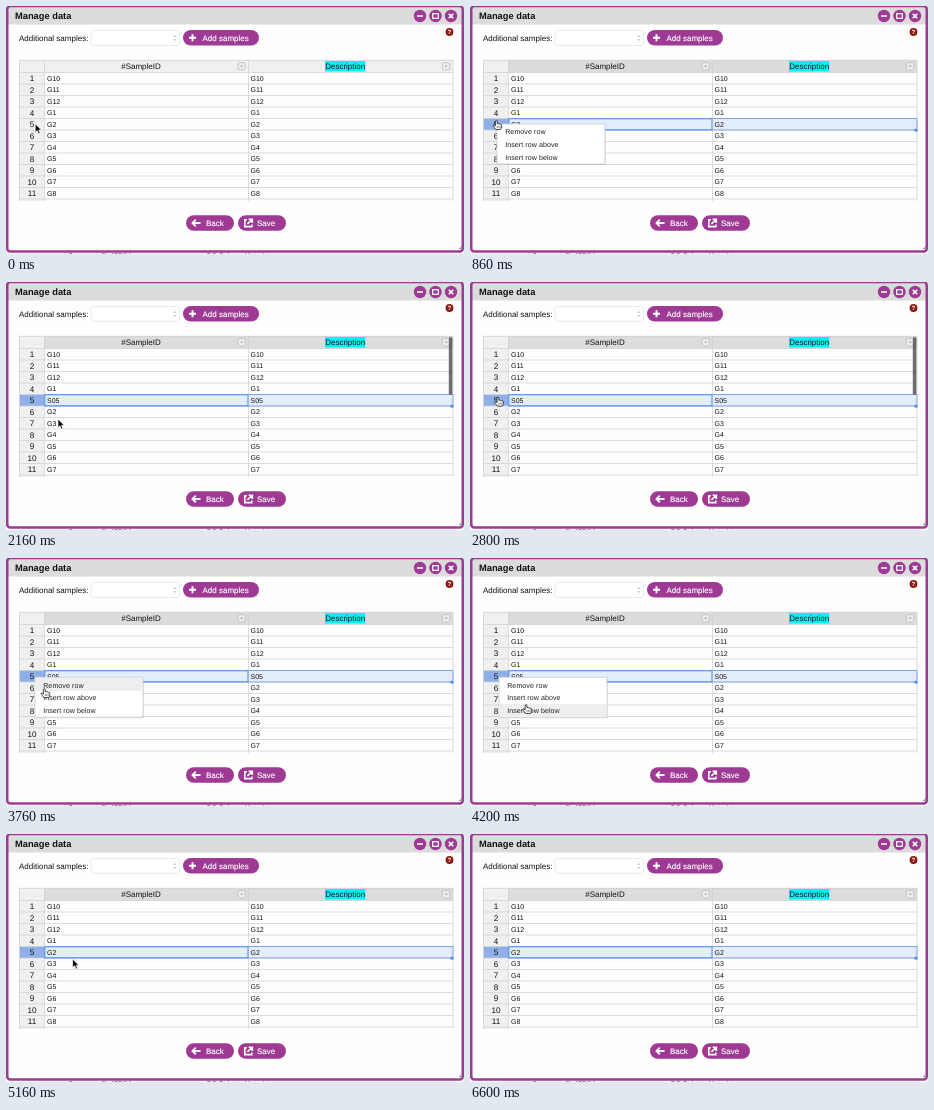
These frames come from a looping animation (458x248 px, 7.63 s). An HTML page:

```html
<!DOCTYPE html>
<html lang="en">
<head>
<meta charset="utf-8">
<title>Manage data</title>
<style>
html, body { margin: 0; width: 100%; height: 100%; overflow: hidden; background: #fff; }
svg {
  display: block; width: 458px; height: 248px;
  font-family: "Liberation Sans", Arial, sans-serif;
  text-rendering: geometricPrecision;
}
</style>
</head>
<body>
<svg id="stage" viewBox="0 0 458 248"></svg>
<script>
const LOOP = 7630, PURPLE = "#9e3a93", GRID = "#d2d2d2", BLUE = "#4b89ff";
const TOP = 66.5, ROW = 11.5;
const stage = document.getElementById("stage");

function add(tag, attrs, parent = stage) {
  const el = document.createElementNS("http://www.w3.org/2000/svg", tag);
  for (const k in attrs) el.setAttribute(k, attrs[k]);
  parent.appendChild(el);
  return el;
}
const group = (parent) => add("g", {}, parent);
const rect = (x, y, width, height, fill, extra, parent) =>
  add("rect", { x, y, width, height, fill, ...extra }, parent);
const path = (d, stroke, width, extra, parent) =>
  add("path", { d, stroke, "stroke-width": width, fill: "none", ...extra }, parent);
function text(str, x, y, size, extra, parent) {
  const el = add("text", { x, y, "font-size": size, fill: "#111", ...extra }, parent);
  el.textContent = str;
  return el;
}
const middle = { "text-anchor": "middle" };
const show = (el, on) => el.setAttribute("visibility", on ? "visible" : "hidden");

// window
text("Summary, PLATE/M", 62, 252, 7, { fill: "#555" });
text("GC Column  Metadata", 200, 252, 7, { fill: "#555" });
rect(1.25, 0, 455.5, 245.5, "#fefefe", { rx: 3 });
rect(2, 0, 454, 18.5, "#dcdcdc");
rect(1.25, 0, 455.5, 245.5, "none", { rx: 3, stroke: PURPLE, "stroke-width": 2.5 });
text("Manage data", 9, 13.2, 9.3, { "font-weight": "bold" });
for (const x of [414, 429.5, 445]) add("circle", { cx: x, cy: 10, r: 6.2, fill: PURPLE });
path("M411 10h6M442.7 7.7l4.6 4.6m0-4.6l-4.6 4.6", "#fff", 1.6);
rect(426.7, 7.7, 5.6, 4.6, "none", { stroke: "#fff", "stroke-width": 1.2 });
path("M453 242.5h1.8v-1.8", "#777", 0.8);

// toolbar
text("Additional samples:", 13, 34.8, 8);
rect(85, 24.5, 88.5, 15, "#fff", { rx: 2, stroke: "#e6e6e6", "stroke-width": 0.8 });
path("M167.4 31l1.4-1.6 1.4 1.6m-2.8 2l1.4 1.6 1.4-1.6", "#aaa", 0.8);
function button(x, y, w, label, labelX) {
  rect(x, y, w, 15.5, PURPLE, { rx: 7.75 });
  text(label, labelX, y + 10.6, 8, { fill: "#fff", stroke: "#fff", "stroke-width": 0.15 });
}
button(177, 24, 76, "Add samples", 196.5);
path("M183 31.8h7m-3.5-3.5v7", "#fff", 1.9);
add("circle", { cx: 443.5, cy: 26, r: 3.9, fill: "#8c1a12" });
text("?", 443.5, 28.3, 6.2, { fill: "#fff", "font-weight": "bold", ...middle });

button(180, 209.3, 48, "Back", 200);
path("M194.5 217h-8m3.3-3.4l-3.4 3.4 3.4 3.4", "#fff", 1.8);
button(232, 209.3, 48, "Save", 251);
path("M241 213.8h-2.2v6.8h7v-2M241.4 218l4.6-4.6m-3.4-.1h3.7v3.7", "#fff", 1.6);

// table
const heads = [rect(38, 54, 204, 12.5, "#f0f0f0"), rect(242, 54, 205, 12.5, "#f0f0f0")];
rect(13, 54, 25, 12.5, "#f0f0f0");
rect(13, TOP, 25, 128.5, "#f0f0f0");
const active = rect(13.5, TOP + 4 * ROW, 24.5, ROW, "#8eb0e7");
let lines = "M13.5 54V195M38.5 54V195M242.5 54V195M447 54V195M13 54.3H447";
for (let i = 0; i < 12; i++) lines += `M13 ${TOP + i * ROW}H447`;
path(lines, GRID, 0.8);
text("#SampleID", 135, 63.2, 8, middle);
rect(319, 55, 40.3, 10.5, "#00f3f7");
text("Description", 339.2, 63.2, 8, middle);
for (const x of [232, 436.5]) {
  rect(x, 56.7, 7.2, 7.2, "#eee", { rx: 1, stroke: "#bbb", "stroke-width": 0.8 });
  path(`M${x + 2.1} 59.5h3l-1.5 2z`, "none", 0, { fill: "#aaa" });
}

const selection = group();
rect(38.5, 112.6, 408.5, 11.6, BLUE, { "fill-opacity": 0.14 }, selection);
rect(38.5, 112.6, 408.5, 11.4, "none", { stroke: "#6b9cec", "stroke-width": 0.8 }, selection);
rect(38.9, 112.8, 203, 11, "none", { stroke: "#5f95ee", "stroke-width": 1 }, selection);
rect(444.6, 122.8, 2.8, 2.8, BLUE, {}, selection);

const base = ["G10", "G11", "G12", "G1", "G2", "G3", "G4", "G5", "G6", "G7", "G8"];
const inserted = [...base.slice(0, 4), "S05", ...base.slice(4, 10)];
const cells = base.map((_, i) => {
  const y = TOP + i * ROW + 8.3;
  text(i + 1, 26, y + 0.4, 8.1, middle);
  return [41, 244.5].map(x => text("", x, y, 7));
});
const bar = rect(442.8, 55, 3.6, 58, "#555", { rx: 1.8, "fill-opacity": 0.85 });

// context menu
const menu = group();
rect(0.8, 1, 108, 40, "#000", { opacity: 0.1, rx: 1 }, menu);
rect(0, 0, 108, 40, "#fff", { stroke: "#ccc", "stroke-width": 0.8 }, menu);
const items = ["Remove row", "Insert row above", "Insert row below"].map((label, i) => {
  const bg = rect(0.5, 1 + i * 12.9, 107, 12.7, "#eee", {}, menu);
  text(label, 8.2, 10.4 + i * 12.9, 7.1, { fill: "#222", "letter-spacing": 0.06 }, menu);
  return bg;
});

// pointers, tip at 0,0
const arrow = group();
path("M0 0V8.6L2 6.8 3.4 10 4.9 9.3 3.5 6.3H6.2Z", "#fff", 0.7, { fill: "#000" }, arrow);
const hand = group();
path("M-.9 .8Q0-.5 .9 .8V3.4Q1.8 2.6 2.6 3.6 3.5 3 4.1 4 5.2 3.6 5.4 4.8V6.6Q5.2 8 4.4 9.2H-.6Q-1.6 7.4-3.2 5.8-3.6 4.4-2.4 4.5L-.9 5.6Z",
  "#222", 0.8, { fill: "#f4f4f4", "stroke-linejoin": "round" }, hand);
path("M1 5.6v2M2.5 5.6v2M3.9 5.6v2", "#444", 0.5, {}, hand);

// time, x, y of the pointer tip
const track = [
  [0, 29.2, 117.8], [60, 29.2, 117.8], [150, 31, 117.4], [430, 26, 116.5],
  [859, 26, 116.5], [860, 26.3, 114.3], [1230, 26.3, 114.3], [1330, 33, 122],
  [1480, 45, 133], [1660, 52, 137], [2430, 52, 137], [2550, 45, 130],
  [2680, 33, 118.5], [2780, 28, 115], [3100, 27.5, 114.5], [3660, 27.5, 114.5],
  [3760, 38.3, 130.3], [3930, 46, 144], [4100, 52, 149], [4250, 58, 145],
  [4430, 63, 138], [4560, 66.5, 129], [4660, 67.3, 127], [4829, 67.3, 127],
  [4830, 66.6, 125], [LOOP, 66.6, 125]
];
function pointer(t) {
  const i = Math.max(1, track.findIndex(p => p[0] > t));
  const [t0, x0, y0] = track[i - 1], [t1, x1, y1] = track[i];
  const k = (t - t0) / (t1 - t0);
  return [x0 + (x1 - x0) * k, y0 + (y1 - y0) * k];
}
const within = (t, a, b) => t >= a && t < b;
const fade = (t, start, from, to) =>
  t < start || t >= to ? 0 : t < from ? 1 : 1 - (t - from) / (to - from);

function draw(now) {
  const t = now % LOOP;
  const [x, y] = pointer(t);
  const first = within(t, 860, 2160), second = within(t, 3430, 4830);

  const names = within(t, 2160, 4830) ? inserted : base;
  cells.forEach((pair, i) => pair.forEach(el => {
    if (el.textContent !== names[i]) el.textContent = names[i];
  }));
  show(selection, t >= 860);
  show(active, t >= 860);
  heads.forEach(h => h.setAttribute("fill", t >= 860 ? "#dcdcdc" : "#f0f0f0"));

  bar.setAttribute("opacity", fade(t, 2160, 2830, 2960) + fade(t, 4830, 5030, 5160));
  bar.setAttribute("height", t < 4830 ? 58 : 60.5);

  const mx = first ? 27 : 29, my = first ? 118 : 119.2;
  menu.setAttribute("transform", `translate(${mx} ${my})`);
  menu.setAttribute("opacity", first || second ? 1 : 0);
  const over = x > mx && y > my ? Math.floor((y - my - 1) / 12.9) : -1;
  items.forEach((bg, i) => bg.setAttribute("opacity", i === over ? 1 : 0));

  const useHand = first || second || within(t, 2430, 3430) && x < 38;
  for (const el of [arrow, hand]) el.setAttribute("transform", `translate(${x} ${y})`);
  show(hand, useHand);
  show(arrow, !useHand);
  arrow.setAttribute("opacity", t < 6560 ? 1 : t < 6600 ? 0.5 : 0);
}
function tick() {
  draw(performance.now());
  requestAnimationFrame(tick);
}
tick();
</script>
</body>
</html>
```
